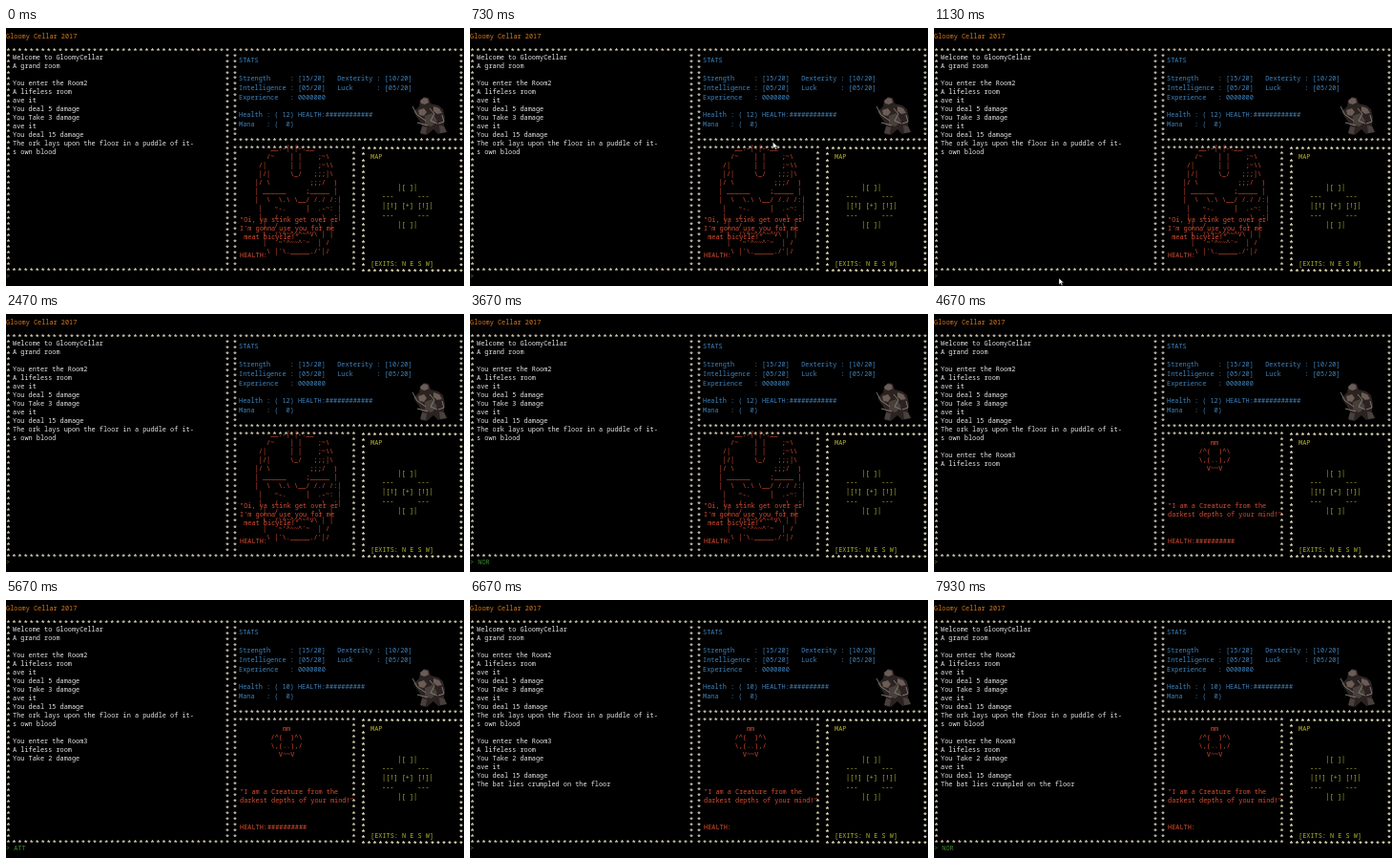
These frames come from a looping animation (480 px wide and 270 px high, 8 s). An HTML page:

```html
<!DOCTYPE html>
<html lang="en">
<head>
<meta charset="utf-8">
<title>Gloomy Cellar</title>
<style>
html, body { margin: 0; width: 100%; height: 100%; overflow: hidden; background: #000; }
svg { display: block; width: 480px; height: 270px; }
text { font: 6.88px "Noto Sans Mono", "DejaVu Sans Mono", monospace; white-space: pre; }
.title { fill: #d9781c; }
.log { fill: #e6e6e6; }
.stats { fill: #3f83bd; }
.foe { fill: #d84c32; }
.map { fill: #b5b52c; }
.cmd { fill: #3f8a2c; }
.star { fill: #d6cfb4; font-size: 7.4px; font-weight: 600; text-anchor: middle; }
.bright { fill: #f0ebc4; font-weight: 800; }
</style>
</head>
<body>
<svg id="stage" viewBox="0 0 480 270" xmlns="http://www.w3.org/2000/svg">
  <g id="hero">
    <path fill="#2a2321" d="M434 76l4-4 5 1 2 6 8 2 5 4 2 9-1 8 3 7-9 2-5-5-7 6-6-1 1-9-4-7-5-7 6-6z"/>
    <path fill="#6b5d56" d="M434 76l4-3 4 1 1 4-4 2-4-1zM432 86l6-2 3 4-3 4-5-1zM448 82l6 2 3 5-5 1-4-3z"/>
    <path fill="#4a403b" d="M439 92l8-3 5 8-6 6-7-2zM454 102l5 1 3 6-7 1zM436 103l5 1-1 7-6-1z"/>
    <path fill="none" stroke="#8c8079" stroke-width=".9" d="M426 82l5 9 9 6M444 84l5 6-4 7 7 3M457 91l2 7-6 2M431 99l11 3"/>
  </g>
  <path id="pointer" d="M0 0v6.4l1.6-1.4 1.2 2.6 1.1-.5-1.2-2.5h2.1z" fill="#fff" stroke="#333" stroke-width=".4"/>
</svg>
<script>
const LOOP = 8000, ROW = 9;
const stage = document.getElementById('stage');
const pointer = document.getElementById('pointer');
const timed = [];

function put(x, y, kind, str) {
  const el = document.createElementNS(stage.namespaceURI, 'text');
  el.setAttribute('x', x);
  el.setAttribute('y', y);
  el.setAttribute('class', kind);
  el.textContent = str;
  stage.insertBefore(el, pointer);
  return el;
}

// Lines are shown while from <= t < to.
function block(x, y, kind, lines, from = 0, to = LOOP, pitch = ROW) {
  lines.forEach((s, i) => {
    if (!s) return;
    const el = put(x, y + i * pitch, kind, s);
    if (from > 0 || to < LOOP) timed.push({ el, from, to });
  });
}

function frame(x0, y0, x1, y1, kind = 'star') {
  const star = (x, y) => put(x, y + 3.4, kind, '*');
  const nx = Math.round((x1 - x0) / 6), ny = Math.round((y1 - y0) / 6);
  for (let i = 0; i <= nx; i++) {
    const x = x0 + (x1 - x0) * i / nx;
    star(x, y0);
    star(x, y1);
  }
  for (let i = 1; i < ny; i++) {
    const y = y0 + (y1 - y0) * i / ny;
    star(x0, y);
    star(x1, y);
  }
}

frame(2.5, 22.5, 232, 252.7);
frame(240, 22.5, 477, 117);
frame(240, 124.5, 364.5, 252.7);
frame(374.5, 126, 477, 254, 'star bright');

block(0, 11.3, 'title', ['Gloomy Cellar 2017']);

block(7, 33.2, 'log', [
  'Welcome to GloomyCellar', 'A grand room', '', 'You enter the Room2', 'A lifeless room',
  'ave it', 'You deal 5 damage', 'You Take 3 damage', 'ave it', 'You deal 15 damage',
  'The ork lays upon the floor in a puddle of it-', 's own blood'
]);
block(7, 150.2, 'log', ['You enter the Room3', 'A lifeless room'], 4670);
block(7, 168.2, 'log', ['You Take 2 damage'], 5670);
block(7, 177.2, 'log', ['ave it', 'You deal 15 damage', 'The bat lies crumpled on the floor'], 6670);

block(244, 36.1, 'stats', [
  'STATS', '',
  'Strength     : [15/20]   Dexterity : [10/20]',
  'Intelligence : [05/20]   Luck      : [05/20]',
  'Experience   : 0000000'
], 0, LOOP, 9.6);
const health = put(244, 92.9, 'stats', '');
block(244, 102.5, 'stats', ['Mana   : (  0)']);

block(260.7, 128.2, 'foe', [
  '    __.-|-|-.__',
  '   /~    | |    ;~\\',
  ' /|      | |    ;~\\\\',
  ' |/|     \\_/   ;;;|\\',
  '|/ \\          ;;;/  )',
  '| ______     ;_____ |',
  '|  \\  \\.\\ \\__/ /./ /:|',
  ' |   ~-.     |  .-~: |',
  ' |   /.         .\\  :|',
  '  |  /          \\  |',
  '  \\  /\\^~^~^~^V\\ | |',
  '  |   ~\'^~~^`~  | /',
  '   \\ |`\\._____./\'|/'
], 0, 4670);
block(245, 203.4, 'foe', ['"Oi, ya stink get over er', 'I\'m gonna use you for me', ' meat bicycle!"'], 0, 4670);

block(277.5, 137.2, 'foe', ['   mm', '/^(  )^\\', '\\,(..),/', '  V~~V'], 4670);
block(245, 203.4, 'foe', ['"I am a Creature from the', 'darkest depths of your mind!"'], 4670);
block(245, 240.4, 'foe', ['HEALTH:']);
block(273.9, 240.4, 'foe', ['#'.repeat(10)], 4670, 6670);

block(382, 137.3, 'map', ['MAP']);
block(394, 168.5, 'map', ['    |[ ]|', '---      ---', '|[!] [+] [!]|', '---      ---', '    |[ ]|'], 0, LOOP, 9.9);
block(382, 248.8, 'map', ['[EXITS: N E S W]']);

block(0, 262.4, 'cmd', ['>']);
const input = put(8.25, 262.4, 'cmd', '');

const typed = [
  { word: 'NORTH', keys: [3470, 3530, 3670, 3800, 3930], end: 4270 },
  { word: 'ATTACK', keys: [5200, 5400, 5530, 5730, 5870, 6000], end: 6200 },
  { word: 'NOR', keys: [7730, 7800, 7930], end: LOOP }
];

// Pointer stops: time, x, y
const path = [
  [70, 66, 76], [270, 66, 76], [670, 330, 110], [1070, 131, 262],
  [1130, 131, 262], [1500, 240, 190], [1930, 465, 262]
];

function movePointer(t) {
  const i = path.findIndex(p => p[0] > t);
  pointer.style.visibility = i > 0 ? 'visible' : 'hidden';
  if (i < 1) return;
  const [t0, x0, y0] = path[i - 1], [t1, x1, y1] = path[i];
  const k = (t - t0) / (t1 - t0), e = k * k * (3 - 2 * k);
  pointer.setAttribute('transform', `translate(${x0 + (x1 - x0) * e} ${y0 + (y1 - y0) * e})`);
}

function draw() {
  const t = performance.now() % LOOP;
  for (const { el, from, to } of timed)
    el.style.visibility = t >= from && t < to ? 'visible' : 'hidden';
  const hp = t < 5670 ? 12 : 10;
  health.textContent = `Health : ( ${hp}) HEALTH:${'#'.repeat(hp)}`;
  const cmd = typed.find(c => t >= c.keys[0] && t < c.end);
  input.textContent = cmd ? cmd.word.slice(0, cmd.keys.filter(k => k <= t).length) : '';
  movePointer(t);
  requestAnimationFrame(draw);
}
draw();
</script>
</body>
</html>
```
